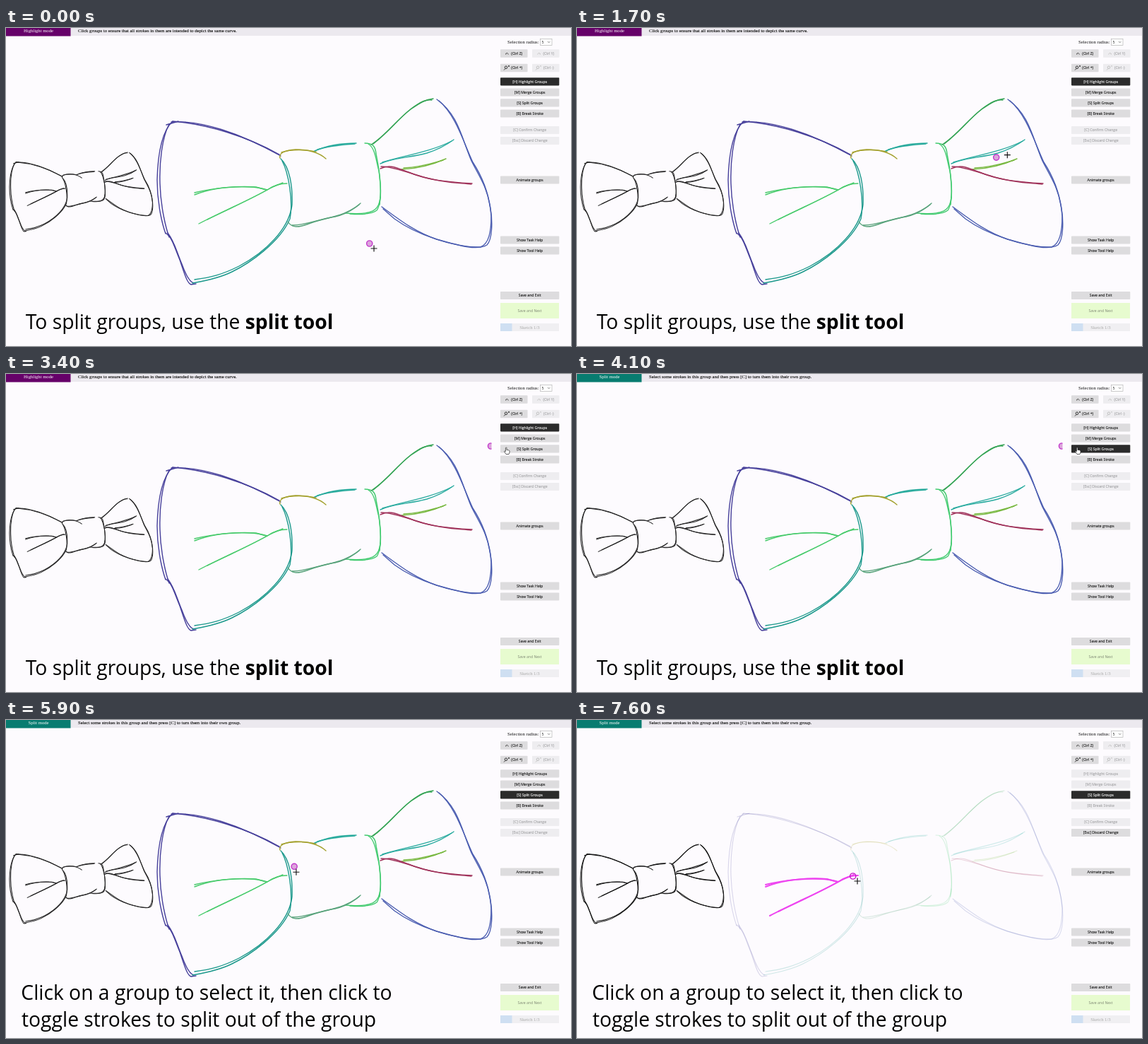
Recreate the animation shown at these times as an HTML page. Size 800x450 px, loop 8 s.

```html
<!DOCTYPE html>
<html lang="en">
<head>
<meta charset="utf-8">
<title>Split tool tutorial</title>
<style>
html, body { margin: 0; width: 100%; height: 100%; overflow: hidden; background: #fdfbfe; }
svg { display: block; width: 100vw; height: 100vh; }
.serif { font: 6.667px "Liberation Serif", serif; }
.ui { font: 5.15px "Open Sans", "Noto Sans", sans-serif; stroke-width: .12px; }
.cap { font: 28.28px "Open Sans", sans-serif; fill: #000; }
.ink path { fill: none; stroke-linecap: round; stroke-linejoin: round; }
.small path { stroke: #141414; vector-effect: non-scaling-stroke; }
</style>
</head>
<body>
<svg id="stage" viewBox="0 0 800 450">
  <defs><clipPath id="canvas"><rect y="11" width="687.5" height="439"/></clipPath></defs>
  <rect width="800" height="450" fill="#fdfbfe"/>
  <rect width="800" height="11" fill="#ece9ef"/>
  <rect id="modeBox" width="91.5" height="11.5"/>
  <text id="mode" class="serif" x="46" y="6.3" fill="#fff" text-anchor="middle"></text>
  <text id="hint" class="serif" x="102" y="6.3" fill="#111" stroke="#111" stroke-width=".12"></text>
  <g id="small" class="ink small" transform="translate(-86.6 133.4) scale(.428 .426)"></g>
  <g id="big" class="ink"></g>
  <g id="panel"></g>
  <g id="cap1"><text class="cap" x="27.7" y="425.5" xml:space="preserve">To split groups, use the <tspan font-weight="700">split tool</tspan></text></g>
  <g id="cap2">
    <text class="cap" x="21.3" y="395.6">Click on a group to select it, then click to</text>
    <text class="cap" x="22" y="434">toggle strokes to split out of the group</text>
  </g>
  <g clip-path="url(#canvas)"><circle id="ring" r="4.1" stroke-width="1.4"/></g>
  <path id="cross" d="M-4.5 0H4.5M0-4.5V4.5" stroke="#111" stroke-width="1.15"/>
  <path id="hand" d="M-1.6-4.3C-1.4-5.3-.1-5.3 0-4.3V-1.5C2-1.8 4 -1 4 .2V2L3 4.5H-1L-3.4 1C-3.8 0-2.7-.5-1.6.8Z" fill="#fff" stroke="#222" stroke-width=".7"/>
</svg>
<script>
const $ = id => document.getElementById(id);
const make = (tag, attrs, parent, text) => {
  const el = document.createElementNS("http://www.w3.org/2000/svg", tag);
  for (const k in attrs) el.setAttribute(k, attrs[k]);
  if (text) el.textContent = text;
  return parent.appendChild(el);
};
const set = (el, attrs) => { for (const k in attrs) el.setAttribute(k, attrs[k]); };
const clamp = u => Math.max(0, Math.min(1, u));
const ease = u => (u = clamp(u), u * u * (3 - 2 * u));
const mix = (a, b, u) => a + (b - a) * u;
const rgb = (a, b, u) => `rgb(${a.map((v, i) => Math.round(mix(v, b[i], u)))})`;

// Stroke groups of the bow tie
const fold = [
  "M267 236C290 227 320 224 345 225C356 225 363 227 370 229",
  "M267 233C295 226 330 223 354 225L368 229",
  "M273 277C310 258 345 243 372 228C382 221 390 220 398 220",
  "M285 271C320 254 350 241 375 226L392 219"
];
const groups = [
  ["#47409b", [
    "M236 132C222 145 215 175 214 215C214 250 222 280 226 291",
    "M231 136C221 155 217 190 218 220C219 255 227 285 231 296",
    "M226 290C236 297 239 312 246 328C252 345 256 361 262 363L269 362",
    "M229 290C239 303 242 318 249 334C254 348 259 359 266 361",
    "M234 133C275 130 330 148 389 181",
    "M236 132C285 136 340 153 387 179",
    "M227 137L244 132"]],
  ["#1a988b", [
    "M389 185C402 197 406 225 405 250C401 284 368 317 330 337C306 349 290 353 267 356",
    "M391 188C400 205 407 245 402 270C388 303 345 333 320 345C300 355 275 359 264 361"]],
  ["#48cb6c", fold],
  ["#a3a02c", [
    "M388 184C386 177 395 173 410 172C428 172 443 176 453 185",
    "M390 176C405 171 425 172 439 175"]],
  ["#27aa9c", ["M437 174C455 166 475 163 496 163", "M441 172C460 166 480 165 494 164"]],
  ["#43cb70", [
    "M508 163C519 163 523 167 524 178C528 198 532 220 530 240C528 258 520 265 481 262",
    "M513 164C523 170 524 188 528 202C531 225 532 248 525 258C517 264 500 264 487 263",
    "M530 239L529 250"]],
  ["#57a27a", [
    "M399 274C404 282 412 283 426 278C450 268 480 268 502 248",
    "M405 279C422 280 440 271 466 267C480 264 490 258 500 250"]],
  ["#35a455", [
    "M517 165C538 152 552 131 573 115C586 106 594 101 605 100",
    "M520 164C545 145 560 122 581 109C590 103 597 101 603 102"]],
  ["#4a5cb0", [
    "M610 101C640 122 645 155 659 188C670 210 681 225 685 250C690 275 688 300 681 307C668 315 645 309 610 299C578 288 558 272 532 253",
    "M613 103C637 123 649 165 661 190C676 213 685 240 687 266C687 288 684 305 672 310C635 311 580 292 550 270L534 256"]],
  ["#27aa9e", ["M530 192C550 183 570 184 596 177C612 172 623 166 634 158", "M533 190C560 181 600 176 631 160"]],
  ["#78b840", ["M560 200C585 199 605 193 623 185", "M563 198C588 197 605 191 619 187"]],
  ["#a0335b", [
    "M530 199C545 192 555 199 570 204C595 215 625 218 660 220",
    "M531 196C550 196 575 207 595 212C620 219 640 219 659 221"]]
];
const faded = [], picked = [];
for (const [color, lines] of groups)
  for (const d of lines) {
    const el = make("path", { d, stroke: color }, $("big"));
    (lines === fold ? picked : faded).push(el);
    make("path", { d }, $("small"));
  }

// Side panel
const panel = $("panel");
const looks = { on: [[221, 220, 222], [25, 25, 25]], off: [[238, 237, 240], [165, 165, 167]], active: [[43, 43, 43], [245, 245, 245]] };
function button(label, y, x = 700, w = 83.3, h = 11.2, shift = 0) {
  const box = make("rect", { x, y: y - h / 2, width: w, height: h, rx: .8 }, panel);
  const text = make("text", { class: "ui", x: x + w / 2 + shift, y: y + 1.8, "text-anchor": "middle" }, panel, label);
  return (a, b = a, u = 0) => {
    const ink = rgb(looks[a][1], looks[b][1], u);
    set(box, { fill: rgb(looks[a][0], looks[b][0], u) });
    set(text, { fill: ink, stroke: ink });
  };
}
make("text", { class: "serif", x: 710, y: 22, fill: "#111" }, panel, "Selection radius:");
make("rect", { x: 756.5, y: 15.5, width: 16.5, height: 9, fill: "#fff", stroke: "#aaa", "stroke-width": .6 }, panel);
make("text", { class: "ui", x: 758.5, y: 22, fill: "#222" }, panel, "5");
make("path", { d: "M767 19l1.7 1.7l1.7-1.7", fill: "none", stroke: "#555", "stroke-width": .7 }, panel);

const pairs = [["(Ctrl Z)", "on", 700, 36], ["(Ctrl Y)", "off", 745, 36], ["(Ctrl +)", "on", 700, 56.5], ["(Ctrl -)", "off", 745, 56.5]];
for (const [label, look, x, y] of pairs) {
  button(label, y, x, 38.5, 11.5, 4)(look);
  const color = look === "on" ? "#222" : "#bbb", flip = label.includes("Y") ? -1 : 1;
  if (y < 40)
    make("path", { d: "M-1.7 1.4V-.4M-1.7 0Q1-2.4 1.7 1.4", transform: `translate(${x + 9.5} ${y + .3}) scale(${flip} 1)`, fill: "none", stroke: color, "stroke-width": .7 }, panel);
  else
    make("path", { d: "M-3 3L-1 1M1.8-.8A1.8 1.8 0 1 1-1.8-.8A1.8 1.8 0 1 1 1.8-.8M3-2.6H5" + (look === "on" ? "M4-3.6V-1.6" : ""), transform: `translate(${x + 8} ${y})`, fill: "none", stroke: color, "stroke-width": .9 }, panel);
}
const highlight = button("[H] Highlight Groups", 75.8);
const merge = button("[M] Merge Groups", 91);
const split = button("[S] Split Groups", 105.9);
const breaks = button("[B] Break Stroke", 121);
button("[C] Confirm Change", 144.5)("off");
const discard = button("[Esc] Discard Change", 159.5);
[["Animate groups", 215], ["Show Task Help", 300], ["Show Tool Help", 315], ["Save and Exit", 378.5]].forEach(([s, y]) => button(s, y)("on"));
make("rect", { x: 700, y: 389, width: 83, height: 22, fill: "#e7fbcf" }, panel);
make("text", { class: "ui", x: 741.5, y: 402, fill: "#7d8673", "text-anchor": "middle" }, panel, "Save and Next");
make("rect", { x: 700, y: 418, width: 83, height: 11, fill: "#f0eff2" }, panel);
make("rect", { x: 700, y: 418, width: 16.5, height: 11, fill: "#cfdff2" }, panel);
make("text", { class: "serif", x: 741.5, y: 425.6, fill: "#aaa", "text-anchor": "middle" }, panel, "Sketch 1/3");

// Pointer legs: start, end, from, to, optional bend
const legs = [
  [1250, 2150, [521, 312], [709, 109], [603, 149.5]],
  [4550, 4960, [709, 109], [538, 182]],
  [5300, 5960, [538, 182], [408, 216]],
  [6350, 6820, [408, 216], [397, 228]]
];
function pointer(t) {
  const leg = legs.filter(l => t >= l[0]).pop() || legs[0];
  const [start, end, from, to, bend] = leg, u = ease((t - start) / (end - start));
  return from.map((a, i) => {
    const c = bend ? bend[i] : (a + to[i]) / 2;
    return mix(mix(a, c, u), mix(c, to[i], u), u);
  });
}

function draw(t) {
  const splitting = t >= 3700, second = t >= 5500;
  set($("modeBox"), { fill: splitting ? "#087c70" : "#660169" });
  $("mode").textContent = splitting ? "Split mode" : "Highlight mode";
  $("hint").textContent = splitting
    ? "Select some strokes in this group and then press [C] to turn them into their own group."
    : "Click groups to ensure that all strokes in them are intended to depict the same curve.";
  set($("cap1"), { visibility: second ? "hidden" : "visible" });
  set($("cap2"), { visibility: second ? "visible" : "hidden" });

  const fade = clamp((t - 6990) / 440), tint = clamp((t - 6990) / 210);
  for (const el of faded) set(el, { "stroke-opacity": mix(1, .2, fade), "stroke-width": mix(1.4, 1.1, fade) });
  for (const el of picked) set(el, { stroke: rgb([72, 203, 108], [238, 70, 240], tint), "stroke-width": mix(1.4, 2, tint) });
  set($("small"), { "stroke-width": 1.05, opacity: mix(.92, 1, fade) });

  highlight(splitting ? "on" : "active", splitting ? "off" : "active", fade);
  merge("on", "off", fade);
  split(splitting ? "active" : "on");
  breaks("on", "off", fade);
  discard("off", "on", fade);

  const [x, y] = pointer(t), [rx, ry] = pointer(t - 30), onButton = x > 694;
  set($("cross"), { transform: `translate(${x} ${y})`, visibility: onButton ? "hidden" : "visible" });
  set($("hand"), { transform: `translate(${x} ${y})`, visibility: onButton ? "visible" : "hidden" });
  const hollow = t >= 6600;
  set($("ring"), {
    cx: Math.min(686.5, rx - 6.3), cy: ry - 7,
    fill: hollow ? "none" : "#dca5dc", stroke: hollow ? "#c512c8" : "#c235cb"
  });
}

const begin = performance.now();
function tick() {
  draw((performance.now() - begin) % 8000);
  requestAnimationFrame(tick);
}
tick();
</script>
</body>
</html>
```
